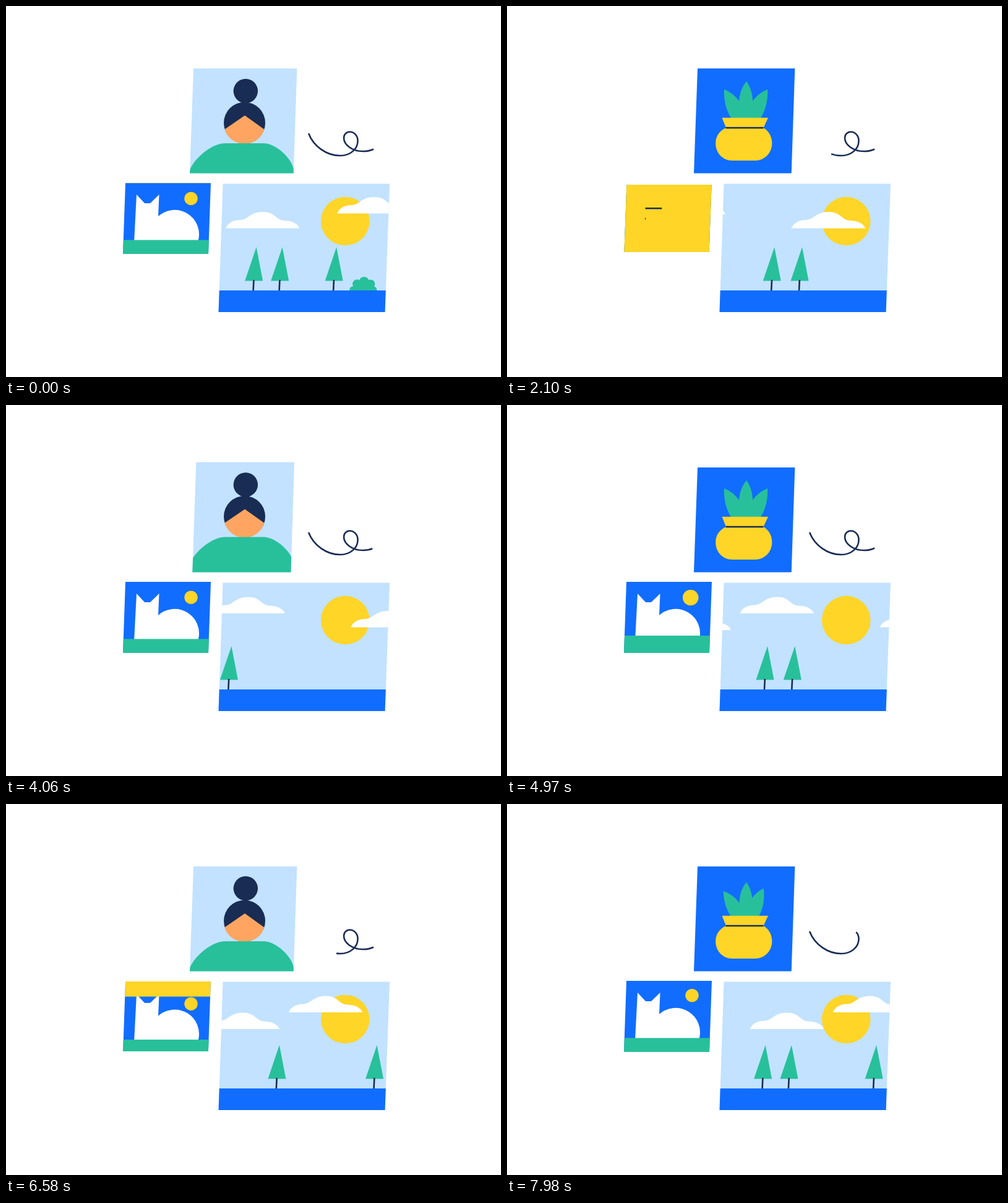
An HTML page that plays this animation: 800x600 px, repeating every 8 s.

```html
<!DOCTYPE html>
<html lang="en">
<head>
<meta charset="utf-8">
<title>Picture wall</title>
<style>
  html, body { margin: 0; width: 100%; height: 100%; overflow: hidden; background: #fff; }
  svg { display: block; width: 100vw; height: 100vh; }
  .sky { fill: #c2e2ff; }
  .blue { fill: #116dff; }
  .green { fill: #28c09b; }
  .yellow { fill: #ffd527; }
  .navy { fill: #192c54; }
  .skin { fill: #ffa561; }
  .white { fill: #fff; }
  .line { fill: none; stroke: #192c54; stroke-width: 2.6; }
</style>
</head>
<body>
<svg viewBox="0 0 800 600">
  <defs>
    <clipPath id="portraitClip"><polygon id="portraitFrame"/></clipPath>
    <clipPath id="catClip"><polygon id="catFrame"/></clipPath>
    <clipPath id="lakeClip"><polygon points="350.5,287.5 620,287.5 612.5,495 343.5,495"/></clipPath>
    <path id="cloud" class="white" d="M0 0C3-8 12-13.3 21-13.3C37-13 38-26.5 60-26.5C81-26.5 80-13 95-12.5C110-12 117-6 119.5 0Z"/>
    <g id="tree">
      <path class="green" d="M0 390L10.5 444.5H-18.5Z"/>
      <path class="line" d="M-4.2 443L-5 460"/>
    </g>
    <path id="leaf" class="green" d="M351 135C350 152 354 170 364 184L388 184C384 162 370 142 351 135Z"/>
    <path id="squiggle" pathLength="100" d="M489 206C497 227 518 242 540 242C557 242 568.5 231 568.5 218C568.5 209 562 203.5 555.5 203.5C550 203.5 546 208 546 213.5C546 224 559 235 577 235C583 235 589 234 594 231.5"/>
  </defs>

  <g clip-path="url(#portraitClip)">
    <g id="person">
      <rect class="sky" x="290" y="80" width="190" height="230"/>
      <circle id="bun" class="navy" cx="387.3" cy="137.5" r="19.7"/>
      <circle class="navy" cx="385.5" cy="189" r="33.5"/>
      <path class="skin" d="M386 177L417.3 199.4A33.5 33.5 0 0 1 353.3 199.4Z"/>
      <path class="green" d="M296 300V269C300 250 331 222 354 222H416C438 222 465 250 465 267V300Z"/>
    </g>
    <g id="plant">
      <rect class="blue" x="290" y="80" width="190" height="230"/>
      <g id="leaves">
        <use id="leftLeaf" href="#leaf"/>
        <use id="rightLeaf" href="#leaf"/>
        <path class="green" d="M387 122C378 133 374 147 375 162L379 190H394L397 162C398 147 395 133 387 122Z"/>
      </g>
      <path class="yellow" d="M347.5 180.7H422L414.5 197C423 202 428.3 211 428.3 222C428.3 238 416 250 401 250H364C349 250 337.2 238 337.2 222C337.2 211 343 202 354 197Z"/>
      <path class="line" d="M353.5 197H414.5"/>
    </g>
  </g>

  <g clip-path="url(#catClip)">
    <rect class="blue" x="185" y="280" width="150" height="125"/>
    <g id="cat">
      <path class="white" d="M211 305L224 319H233L247.5 305L246 340A39.5 39.5 0 0 1 310.8 379V382H207Z"/>
    </g>
    <rect id="grass" class="green" x="185" width="150" height="140"/>
    <circle id="moon" class="yellow"/>
    <g id="note">
      <rect class="yellow" x="185" y="270" width="150" height="131"/>
    </g>
    <g id="writing" class="line">
      <path pathLength="100" d="M223.5 327.3H300"/>
      <path pathLength="100" d="M223 344H261"/>
      <path pathLength="100" d="M222.5 360.5H283"/>
    </g>
  </g>

  <g clip-path="url(#lakeClip)">
    <rect class="sky" x="340" y="280" width="285" height="220"/>
    <circle class="yellow" cx="548.2" cy="348" r="39.3"/>
    <g id="clouds"></g>
    <g id="trees"></g>
    <g id="shrubs" class="green">
      <circle cx="578.5" cy="446" r="8"/>
      <circle cx="567" cy="449.5" r="7.2"/>
      <circle cx="589" cy="449.5" r="7"/>
      <circle cx="561" cy="459.5" r="6.2"/>
      <circle cx="593" cy="459.5" r="6.2"/>
      <circle cx="578" cy="457" r="12"/>
      <path d="M306.6 443L309.6 460H329.6L333.6 444L326.6 451.5L323.6 444L319.6 430L316.6 444L313.6 451.5Z"/>
    </g>
    <rect class="blue" x="340" y="460" width="280" height="40"/>
  </g>

  <use id="tail" class="line" href="#squiggle"/>
  <use id="head" class="line" href="#squiggle"/>
</svg>

<script>
const LOOP = 8000;
const PANEL_CYCLE = 3500;
const SQUIGGLE_CYCLE = 4400;

const $ = id => document.getElementById(id);
const set = (id, attrs) => {
  for (const name in attrs) $(id).setAttribute(name, attrs[name]);
};
const smooth = u => (1 - Math.cos(Math.PI * u)) / 2;
const cubicIn = u => u ** 3;
const cubicOut = u => 1 - (1 - u) ** 3;
const ramp = (t, from, to, ease = smooth) =>
  ease(Math.min(1, Math.max(0, (t - from) / (to - from))));
const move = (x, y) => `translate(${x} ${y})`;

const clouds = [[355, 359.5], [535, 335.5], [129, 337], [-5, 364]];
const trees = [534, 446.5, 404.5, 244, 199.2, -86, -130.3, -288, -425.2, -467.5];

const stamp = (layer, shape, x, y) => {
  const use = document.createElementNS('http://www.w3.org/2000/svg', 'use');
  use.setAttribute('href', shape);
  use.setAttribute('transform', move(x, y));
  $(layer).append(use);
};
clouds.forEach(([x, y]) => stamp('clouds', '#cloud', x, y));
trees.forEach(x => stamp('trees', '#tree', x, 0));

function drawPortrait(t) {
  const narrow = ramp(t, 320, 640);
  const widen = ramp(t, 2180, 2530);
  const lift = 10 * (narrow - ramp(t, 640, 960)) + 13.3 * (widen - ramp(t, 2660, 2980));
  const inset = 5 * (narrow - widen);
  const top = 101 - lift;
  set('portraitFrame', {
    points: `${303 + inset},${top} ${470.3 - inset},${top} ${464.7 - inset},270.5 ${297 + inset},270.5`
  });

  const planted = t >= 640 && t < 2660;
  set('plant', { visibility: planted ? 'visible' : 'hidden', transform: move(0, -lift) });
  set('person', { visibility: planted ? 'hidden' : 'visible', transform: move(0, -lift) });
  set('bun', { cy: 137.5 - 8 * (ramp(t, 2700, 2850) - ramp(t, 2850, 3150)) });

  const sprout = ramp(t, 640, 1120);
  const sway = -22 * (1 - sprout);
  const spread = 6.7 * widen;
  set('leaves', { transform: `translate(386 190) scale(${0.65 + 0.35 * sprout}) translate(-386 -190)` });
  set('leftLeaf', { transform: `rotate(${sway - spread} 386 190)` });
  set('rightLeaf', { transform: `rotate(${sway + spread} 386 190) translate(772 0) scale(-1 1)` });
}

function drawCat(t) {
  // The note slides away across the cycle boundary.
  const opening = t < 1000 ? t + PANEL_CYCLE : t;
  const cover = 1 - ramp(opening, 3200, 4140, cubicOut);
  const sliding = opening >= 3200;
  const swell = sliding ? 0 : ramp(t, 1650, 2450, cubicIn);
  const shrink = sliding ? 0 : ramp(t, 1500, 1650);
  const inset = sliding ? 4 * cover : 4 * ramp(t, 2350, 2700);
  const rise = sliding ? 0 : ramp(t, 1000, 1470);
  const drop = sliding ? cover : 0;
  const slide = -115 * (1 - cover);

  const top = 286 + inset, bottom = 401 - inset, side = inset / 8;
  set('catFrame', {
    points: `${193 + side},${top} ${331 - side},${top} ${327 - side},${bottom} ${189 + side},${bottom}`
  });
  set('cat', { transform: move(0, 12 * drop) });
  set('grass', { y: 378.4 + 12 * drop - 92 * swell });
  set('moon', {
    cx: 299 - 39 * swell,
    cy: 311.2 + 54 * drop - 1.6 * rise + 33 * swell,
    r: 10.7 - 3.1 * shrink + 88 * swell
  });
  set('note', { visibility: sliding ? 'visible' : 'hidden', transform: move(0, slide) });

  const written = opening > 2450 && cover > 0.3;
  set('writing', { visibility: written ? 'visible' : 'hidden', transform: move(0, slide) });
  [...$('writing').children].forEach((stroke, i) => {
    const length = 100 * ramp(opening, 2450 + 100 * i, 2800 + 100 * i);
    stroke.setAttribute('stroke-dasharray', `${length} 200`);
  });
}

function drawSquiggle(t) {
  set('tail', { 'stroke-dasharray': `0 ${100 * ramp(t, 1372, 3580)} 100 100` });
  set('head', { 'stroke-dasharray': `${100 * ramp(t, 2880, 4140)} 200` });
}

function render(now) {
  const t = now % LOOP;
  drawPortrait(t % PANEL_CYCLE);
  drawCat((t + 490) % PANEL_CYCLE);
  drawSquiggle(t % SQUIGGLE_CYCLE);
  set('clouds', { transform: move(0.0498 * t, 0) });
  set('trees', { transform: move(0.1109 * t, 0) });
  set('shrubs', { transform: move(0.22 * t, 0) });
}

const start = performance.now();
function tick() {
  render(performance.now() - start);
  requestAnimationFrame(tick);
}
tick();
</script>
</body>
</html>
```
